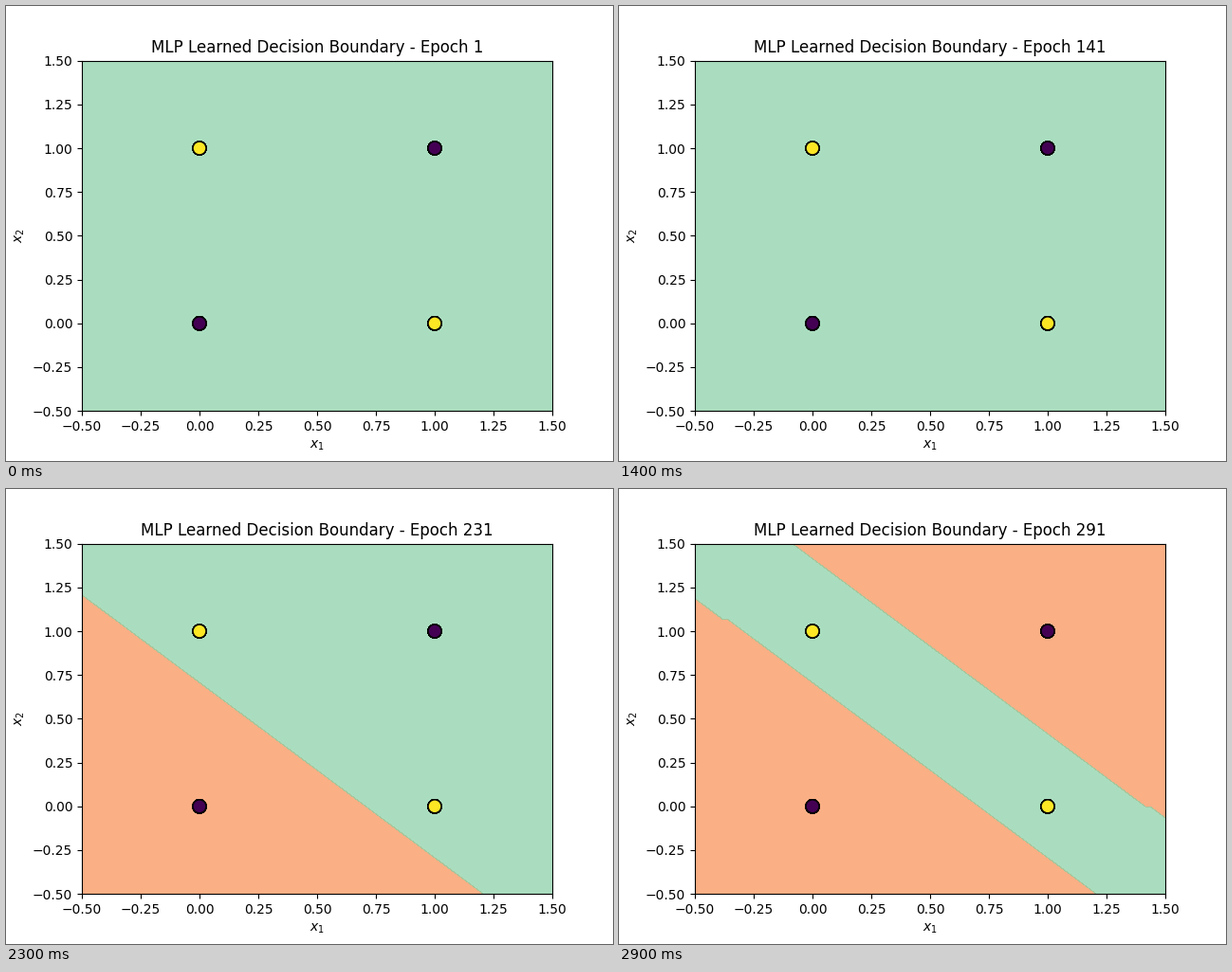
These frames come from a looping animation (640 px wide and 480 px high, 3000 ms). A matplotlib script:

```python
import numpy as np
import matplotlib.pyplot as plt
from matplotlib.animation import FuncAnimation

FRAMES, INTERVAL = 30, 100
GRID = 100        # samples per axis
TILT = 0.005      # slight lean of the boundary off the diagonal
FIRST, SPLIT = 19, 24   # steps at which each boundary appears
RISE = [70, 77.3, 81.2, 83.2, 84.3]

axis = np.linspace(-0.5, 1.5, GRID)
xx, yy = np.meshgrid(axis, axis)
col, row = np.meshgrid(np.arange(GRID), np.arange(GRID))
score = (1 - TILT) * col + row

# The four XOR corners, each sampled many times
points = np.tile([[0, 0], [0, 1], [1, 0], [1, 1]], (50, 1))
labels = points[:, 0] ^ points[:, 1]

fig, ax = plt.subplots(figsize=(6.4, 4.8), dpi=100)


def band(step):
    """Lower and upper limit of the positive class, in grid units."""
    if step < FIRST:
        return -np.inf, np.inf
    if step < SPLIT:
        return RISE[step - FIRST], np.inf
    t = (1 - 0.6 ** (step - SPLIT)) / (1 - 0.6 ** (FRAMES - 1 - SPLIT))
    low = 81.8625 + t * (83.9675 - 81.8625)
    high = 121.7725 + t * (119.5225 - 121.7725)
    return low, high


def draw(step):
    ax.clear()
    low, high = band(step)
    pred = ((score >= low) & (score < high)).astype(float)
    ax.contourf(xx, yy, pred, levels=[0, 0.5, 1], cmap="Spectral", alpha=0.7)
    ax.scatter(points[:, 0], points[:, 1], c=labels, s=100,
               cmap="viridis", edgecolors="k")
    ax.set(xlim=(-0.5, 1.5), ylim=(-0.5, 1.5),
           xlabel="$x_1$", ylabel="$x_2$",
           title=f"MLP Learned Decision Boundary - Epoch {10 * step + 1}")


anim = FuncAnimation(fig, draw, frames=FRAMES, interval=INTERVAL,
                     init_func=lambda: None, repeat=True, repeat_delay=0)
plt.show()
```
